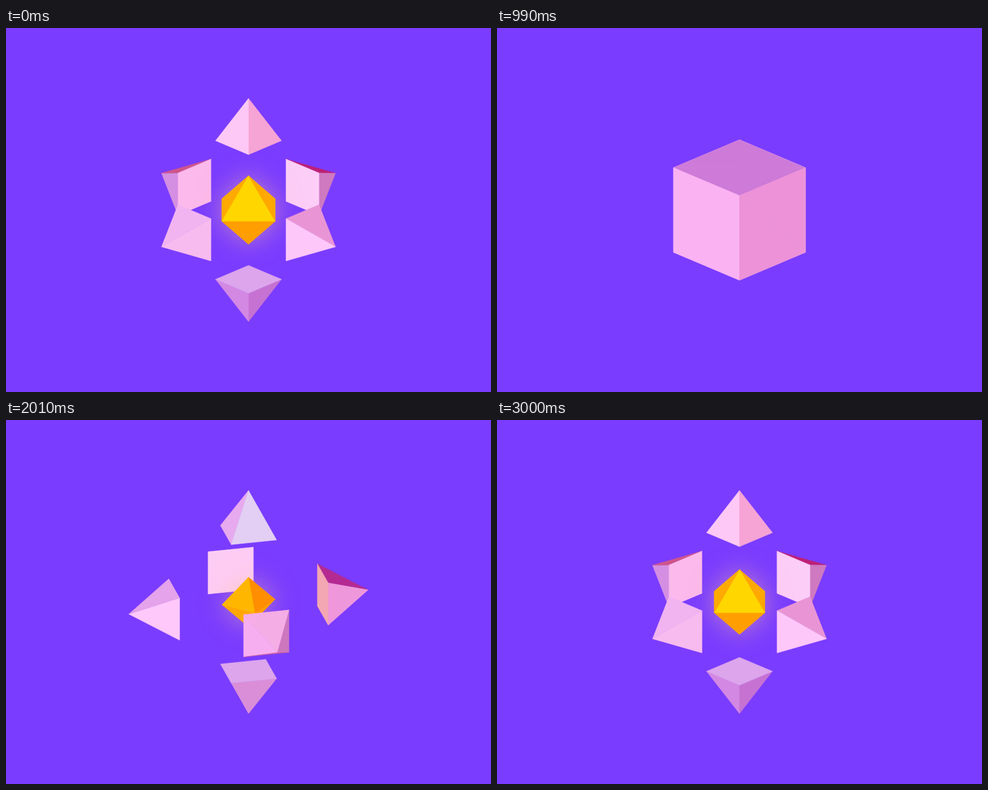
An HTML page with a canvas that plays this animation: 800x600 px, repeating every 3.03 s.

```html
<!DOCTYPE html>
<html lang="en">
<head>
<meta charset="utf-8">
<title>Cube and octahedron</title>
<style>
  html, body { margin: 0; width: 100%; height: 100%; overflow: hidden; background: #7a3cff; }
  canvas { display: block; }
</style>
</head>
<body>
<canvas id="stage" width="800" height="600"></canvas>
<script>
const ctx = document.getElementById('stage').getContext('2d');
const LOOP = 3030, STEP = 30, HALF = 77;
const RAD = Math.PI / 180;
const TILT = { sin: Math.sin(25 * RAD), cos: Math.cos(25 * RAD) };

// Vectors: x right, y up, z towards the viewer
const dot = (a, b) => a[0] * b[0] + a[1] * b[1] + a[2] * b[2];
const mul = (a, k) => a.map(v => v * k);
const add = (...list) => [0, 1, 2].map(i => list.reduce((sum, v) => sum + v[i], 0));
const unit = a => mul(a, 1 / Math.hypot(...a));
const aim = (az, el = 0) => [
  Math.sin(az * RAD) * Math.cos(el * RAD),
  Math.sin(el * RAD),
  Math.cos(az * RAD) * Math.cos(el * RAD)
];
const UP = [0, 1, 0];
const VIEW = [0, TILT.sin, TILT.cos];
const project = p => [400 + p[0], 300 - p[1] * TILT.cos + p[2] * TILT.sin];

// Shades: azimuth, elevation and colour of a face looking that way
const shades = text => text.trim().split(/\s*,\s*/).map(item => {
  const [az, el, hex] = item.split(' ');
  return { dir: aim(+az, +el), rgb: [1, 3, 5].map(i => parseInt(hex.slice(i, i + 2), 16)) };
});
const OUTER = shades(`
  -45 0 #ffb5f5, 45 0 #f092d8, 0 90 #c87de5,
  -45 27 #fecbf6, 45 27 #f8a2d4, 13 27 #e0d3f5, -77 27 #e9aaee, 97 27 #c03368,
  -45 63 #fcc0f2, 45 63 #ec95d1, 10 63 #fdbcee, -80 63 #dda0f0,
  -135 63 #cc4878, 135 63 #c5185f, 100 63 #a5229f,
  18 0 #fcc0f2, -17 0 #ffc9fb, -72 0 #cf8ae0, 72 0 #cb78bf,
  -45 -27 #d084e2, 45 -27 #c26fd2, 10 -27 #d98cd7, 5 -63 #d0609c`);
const BASE = shades('-45 0 #fccdf8, 45 0 #fbb9ec, 10 0 #fdcdf4, -80 0 #f3a6b0, 0 90 #dca5ec');
const GOLD = shades(`
  0 35 #ffd900, -90 35 #ffaa00, 90 35 #ffaa00, -32 35 #ffb300, 58 35 #ff8c00,
  0 -35 #ff9d00, -32 -35 #ffa800`);

function shade(table, normal) {
  let total = 0, rgb = [0, 0, 0];
  for (const s of table) {
    const w = Math.exp(25 * (dot(s.dir, normal) - 1));
    total += w;
    rgb = add(rgb, mul(s.rgb, w));
  }
  return `rgb(${mul(rgb, 1 / total).map(Math.round)})`;
}

// Slow start, quick middle, long settling end
function ease(x) {
  let lo = 0, hi = 1;
  for (let i = 0; i < 24; i++) {
    const u = (lo + hi) / 2, v = 1 - u;
    if (3 * u * v * v * 0.65 + 3 * u * u * v * 0.2 + u ** 3 < x) lo = u; else hi = u;
  }
  return lo * lo * (3 - 2 * lo);
}
function track(keys, t) {
  const i = keys.findIndex(k => t < k[0]);
  if (i < 0) return keys[keys.length - 1][1];
  if (i === 0) return keys[0][1];
  const [t0, a] = keys[i - 1], [t1, b] = keys[i];
  return a + (b - a) * ease((t - t0) / (t1 - t0));
}
const DISTANCE = [[0, 126], [390, 251], [930, 77], [1515, 77], [2010, 126]];
const HEIGHT = [[540, 77], [930, 0], [1290, 0], [2010, 77]];
const YAW = [[990, 0], [3030, -180]];

// Smooth periodic curve through the radii of the golden core
const CORE = [[0, 62.3], [390, 146], [570, 132], [720, 55], [840, 0], [1440, 0],
  [1710, 25], [2010, 45], [2580, 69], [2970, 59]];
function coreRadius(t) {
  const n = CORE.length;
  const key = i => {
    const turn = Math.floor(i / n), k = CORE[i - turn * n];
    return [k[0] + turn * LOOP, k[1]];
  };
  let i = 0;
  while (key(i + 1)[0] <= t) i++;
  const [p, a, b, q] = [-1, 0, 1, 2].map(o => key(i + o));
  const span = b[0] - a[0], u = (t - a[0]) / span, v = 1 - u;
  const slopeA = (b[1] - p[1]) / (b[0] - p[0]) * span;
  const slopeB = (q[1] - a[1]) / (q[0] - a[0]) * span;
  return Math.max(0, v * v * (1 + 2 * u) * a[1] + u * u * (1 + 2 * v) * b[1]
    + u * v * v * slopeA - u * u * v * slopeB);
}

function pyramid(axis, u, v, d, h) {
  const s = HALF - h / 2;
  const foot = mul(axis, d), apex = mul(axis, d + h);
  const corner = (a, b) => add(foot, mul(a, s), mul(b, s));
  const ring = [u, v, mul(u, -1), mul(v, -1)];
  const faces = ring.map((side, i) => {
    const next = ring[(i + 1) % 4];
    return {
      points: [apex, corner(side, next), corner(side, mul(next, -1))],
      normal: unit(add(mul(axis, s), mul(side, h))),
      table: OUTER
    };
  });
  faces.push({
    points: ring.map((a, i) => corner(a, ring[(i + 1) % 4])),
    normal: mul(axis, -1),
    table: BASE
  });
  return { depth: dot(foot, VIEW), faces };
}

function octahedron(yaw, r) {
  const axes = [aim(45 + yaw), aim(135 + yaw), UP];
  const faces = [];
  for (let bits = 0; bits < 8; bits++) {
    const dirs = axes.map((a, i) => mul(a, bits >> i & 1 ? 1 : -1));
    faces.push({ points: dirs.map(a => mul(a, r)), normal: unit(add(...dirs)), table: GOLD });
  }
  return { depth: 0, faces, glow: true };
}

function trace(points) {
  points.map(project).forEach(([x, y], i) => i ? ctx.lineTo(x, y) : ctx.moveTo(x, y));
  ctx.closePath();
}

function drawSolid({ faces, glow }) {
  const seen = faces.filter(f => dot(f.normal, VIEW) > 0.001);
  if (glow) {
    ctx.save();
    ctx.shadowColor = 'rgba(255, 195, 150, 0.5)';
    ctx.shadowBlur = 42;
    ctx.fillStyle = '#ffaa00';
    ctx.beginPath();
    seen.forEach(f => trace(f.points));
    ctx.fill();
    ctx.restore();
  }
  for (const f of seen) {
    ctx.fillStyle = ctx.strokeStyle = shade(f.table, f.normal);
    ctx.beginPath();
    trace(f.points);
    ctx.fill();
    ctx.stroke();
  }
}

function draw(t) {
  const d = track(DISTANCE, t), h = track(HEIGHT, t), yaw = track(YAW, t);
  const r = coreRadius(t);
  const solids = [45, 135, 225, 315].map(az =>
    pyramid(aim(az + yaw), aim(az + 90 + yaw), UP, d, h));
  for (const sign of [1, -1])
    solids.push(pyramid(mul(UP, sign), aim(45 + yaw), aim(135 + yaw), d, h));
  if (r > 0.5) solids.push(octahedron(yaw, r));
  solids.sort((a, b) => a.depth - b.depth);

  ctx.fillStyle = '#7a3cff';
  ctx.fillRect(0, 0, 800, 600);
  ctx.lineWidth = 0.5;
  ctx.lineJoin = 'round';
  solids.forEach(drawSolid);
}

const start = performance.now();
function tick() {
  const t = (performance.now() - start) % LOOP;
  draw(Math.floor(t / STEP) * STEP);
  requestAnimationFrame(tick);
}
tick();
</script>
</body>
</html>
```
